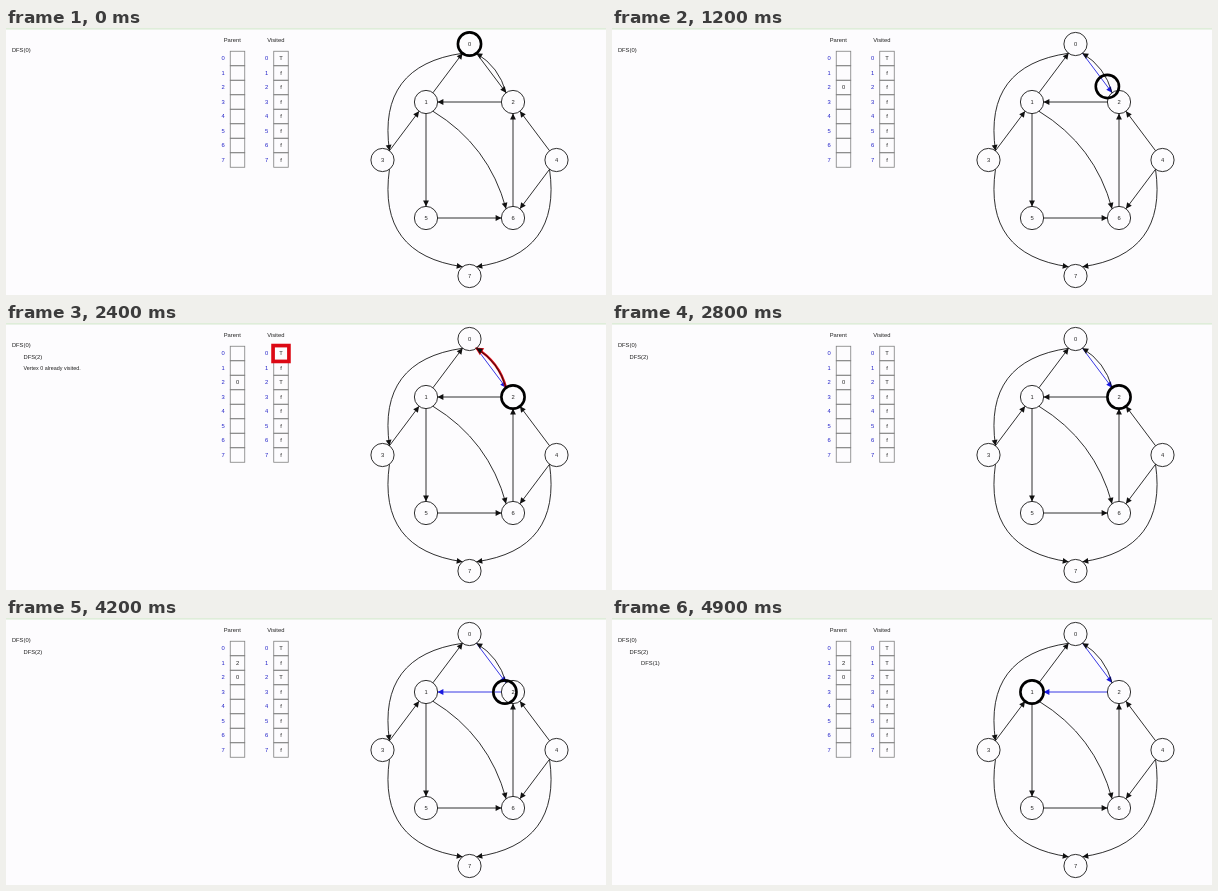
An HTML page with a canvas for the animation above (5 s loop, 600x267 px).

```html
<!DOCTYPE html>
<html lang="en">
<head>
<meta charset="utf-8">
<title>Depth-first search</title>
<style>
  html, body { margin: 0; width: 100%; height: 100%; overflow: hidden; background: #fdfcfe; }
  canvas { display: block; width: 600px; height: 267px; }
</style>
</head>
<body>
<canvas id="stage"></canvas>
<script>
const W = 600, H = 267, LOOP = 5000;
const STEP = 688, FIRST = 9;          // length of one algorithm step, time of the first
const SCALE = 0.58, R = 20, CELL = 25;
const INK = '#111', RED = '#dc0814', BLUE = '#1a1adf', INDEX = '#2020c8';
const PAPER = '#fdfcfe';

const canvas = document.getElementById('stage');
const ctx = canvas.getContext('2d');
const dpr = window.devicePixelRatio || 1;
canvas.width = W * dpr;
canvas.height = H * dpr;

const nodes = [[800, 25], [725, 125], [875, 125], [650, 225],
               [950, 225], [725, 325], [875, 325], [800, 425]];

// from, to, curve
const edges = [
  [0, 2, 0], [2, 0, 0.2], [1, 0, 0], [2, 1, 0], [3, 1, 0], [1, 5, 0], [1, 6, -0.2],
  [5, 6, 0], [6, 2, 0], [4, 2, 0], [4, 6, 0], [0, 3, 0.5], [3, 7, 0.5], [4, 7, -0.5]
];

const stepTime = n => FIRST + n * STEP;
const clamp = v => Math.max(0, Math.min(1, v));
const lerp = (a, b, p) => a + (b - a) * p;

// Highlight thickness swings between 3 and 7
function pulse(t) {
  const half = 570;
  const phase = (((t - 2780) % (2 * half)) + 2 * half) % (2 * half);
  return 3 + 4 * Math.abs(phase - half) / half;
}

function text(str, x, y, color = '#222', align = 'center', size = 10) {
  ctx.font = size + 'px "Liberation Sans", Arial, sans-serif';
  ctx.textAlign = align;
  ctx.textBaseline = 'middle';
  ctx.fillStyle = color;
  ctx.fillText(str, x, y);
}

function circle(x, y, width) {
  ctx.beginPath();
  ctx.arc(x, y, R, 0, Math.PI * 2);
  ctx.lineWidth = width;
  ctx.strokeStyle = width > 2 ? '#000' : INK;
  ctx.stroke();
}

function edgeShape([a, b, curve]) {
  const [ax, ay] = nodes[a], [bx, by] = nodes[b];
  const dx = bx - ax, dy = by - ay, len = Math.hypot(dx, dy);
  const ox = dx / len * R, oy = dy / len * R;
  const from = [ax + ox, ay + oy], to = [bx - ox, by - oy];
  const cx = (from[0] + to[0]) / 2 - (to[1] - from[1]) * curve;
  const cy = (from[1] + to[1]) / 2 + (to[0] - from[0]) * curve;
  return { from, to, cx, cy };
}

function drawEdge(edge, color, width, headPad) {
  const { from, to, cx, cy } = edgeShape(edge);
  ctx.strokeStyle = ctx.fillStyle = color;
  ctx.lineWidth = width;
  ctx.beginPath();
  ctx.moveTo(...from);
  ctx.quadraticCurveTo(cx, cy, ...to);
  ctx.stroke();

  const len = Math.hypot(cx - to[0], cy - to[1]);
  const ux = (cx - to[0]) / len, uy = (cy - to[1]) / len;
  const bx = to[0] + ux * 10, by = to[1] + uy * 10;
  ctx.beginPath();
  ctx.moveTo(...to);
  ctx.lineTo(bx - uy * 5, by + ux * 5);
  ctx.lineTo(bx + uy * 5, by - ux * 5);
  ctx.closePath();
  ctx.fill();
  if (headPad) {
    ctx.lineWidth = headPad;
    ctx.stroke();
  }
}

function drawTable(x, title, values) {
  text(title, x - 9, 18);
  values.forEach((value, i) => {
    const y = 50 + i * CELL;
    text(i, x - CELL, y + 0.5, INDEX);
    ctx.strokeStyle = '#808080';
    ctx.lineWidth = 1.4;
    ctx.strokeRect(x - CELL / 2, y - CELL / 2, CELL, CELL);
    text(value, x, y + 0.5);
  });
}

function drawCellMark(row, value, size) {
  const x = 475, y = 50 + row * CELL;
  const outer = CELL / 2 + size, inner = CELL / 2 - 2;
  ctx.fillStyle = RED;
  ctx.fillRect(x - outer, y - outer, outer * 2, outer * 2);
  ctx.fillStyle = PAPER;
  ctx.fillRect(x - inner, y - inner, inner * 2, inner * 2);
  text(value, x, y + 0.5);
}

function drawLog(str, depth, row, size) {
  text(str, 11 + depth * 20, 36 + row * 20, '#222', 'left', size);
}

function draw(t) {
  const step = Math.floor((t - FIRST) / STEP);
  const size = pulse(t);

  ctx.setTransform(dpr, 0, 0, dpr, 0, 0);
  ctx.fillStyle = PAPER;
  ctx.fillRect(0, 0, W, H);
  ctx.fillStyle = '#deedd9';
  ctx.fillRect(0, 0, W, 1.6);
  ctx.transform(SCALE, 0, 0, SCALE, -0.5, 1.5);

  // Call log
  drawLog('DFS(0)', 0, 0);
  if (step >= 2) drawLog('DFS(2)', 1, 1);
  if (step === 3) drawLog('Vertex 0 already visited.', 1, 2, 9.3);
  if (step >= 7) drawLog('DFS(1)', 2, 2);

  // Arrays
  const parent = Array(8).fill('');
  const visited = Array(8).fill('f');
  visited[0] = 'T';
  if (step >= 1) parent[2] = '0';
  if (step >= 2) visited[2] = 'T';
  if (step >= 6) parent[1] = '2';
  if (step >= 7) visited[1] = 'T';
  drawTable(400, 'Parent', parent);
  drawTable(475, 'Visited', visited);

  // Edge being tested, and the row it leads to
  const tested = { 0: edges[0], 3: edges[1], 5: edges[3] }[step];
  if (tested) drawCellMark(tested[1], visited[tested[1]], size);

  // Graph
  for (const edge of edges) {
    const inTree = (edge === edges[0] && step >= 1) || (edge === edges[3] && step >= 6);
    if (edge === tested) drawEdge(edge, RED, size, size * 0.6);
    drawEdge(edge, inTree ? BLUE : INK, 1.5);
  }
  nodes.forEach(([x, y], i) => {
    circle(x, y, 1.5);
    text(i, x, y);
  });

  // Ring on the current vertex
  const [a, b, start] = step < 6 ? [0, 2, stepTime(1)] : [2, 1, stepTime(6)];
  const p = clamp((t - start) / STEP);
  circle(lerp(nodes[a][0], nodes[b][0], p), lerp(nodes[a][1], nodes[b][1], p), 4.5);
}

const begin = performance.now();
function tick() {
  draw((performance.now() - begin) % LOOP);
  requestAnimationFrame(tick);
}
tick();
</script>
</body>
</html>
```
